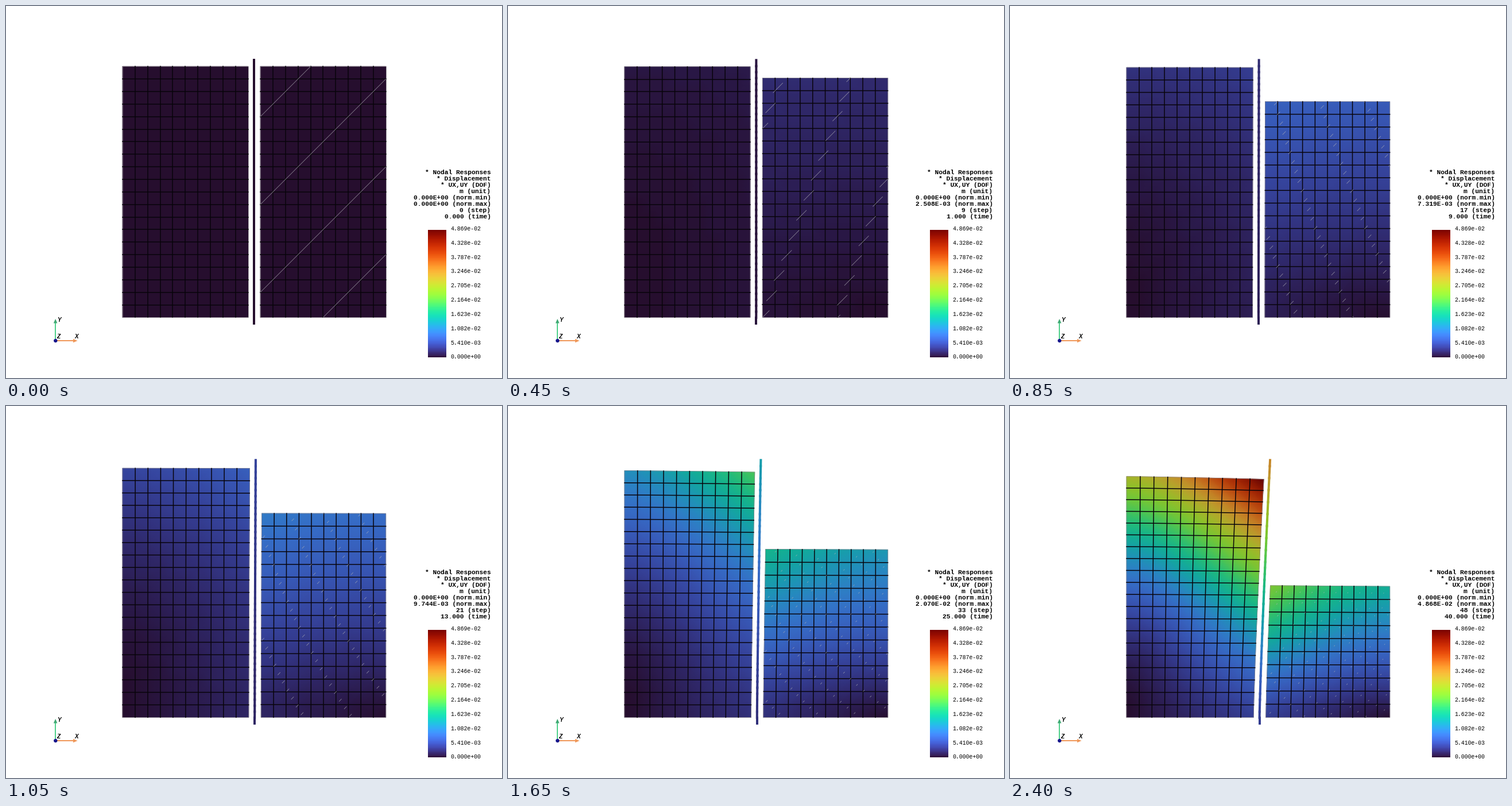
A matplotlib script for the animation above (2.45 s loop, 864 px wide and 648 px high).

```python
import math

import numpy as np
import matplotlib.pyplot as plt
from matplotlib.animation import FuncAnimation
from matplotlib.collections import LineCollection
from matplotlib.colors import ListedColormap, Normalize
from matplotlib.patches import Circle, Polygon, Rectangle

W, H, DPI = 864, 648, 100
STEPS, GRAVITY = 49, 8
CELL, COLS, ROWS = 153 / 7, 10, 20
LEFT, RIGHT, WALL, BASE = 203.0, 443.1, 432.0, 542.4
HEIGHT = CELL * ROWS
PX_PER_M = 622
VMAX = 4.869e-2

# Displacements in pixels at the excavation stages listed first.
STAGE = [0, 1, 3, 5, 7, 8.3, 10.3]
WALL_FOOT = [0, 0.3, 0.9, 1.5, 1.8, 2.2, 2.6]
WALL_TOP = [0, 0.4, 1.6, 4.2, 8.2, 11.4, 20.5]
SINK_FAR = [0, 0.5, 1.9, 4.2, 7.4, 10, 17.5]
SINK_NEAR = [0, 0.5, 2, 5, 9.9, 13.1, 22.3]
HEAVE = [0, 1.55, 4.4, 6.9, 8.7, 9.4, 11]
PEAK = [0, 2.508e-3, 7.319e-3, 1.217e-2, 2.070e-2, 2.788e-2, 4.868e-2]

turbo = plt.get_cmap("turbo")
lit = ListedColormap(turbo(np.linspace(0, 1, 256)) * [0.78, 0.78, 0.78, 1])
norm = Normalize(0, VMAX)


def px(n):
    return n * 72 / DPI


fig = plt.figure(figsize=(W / DPI, H / DPI), dpi=DPI, facecolor="white")
ax = fig.add_axes([0, 0, 1, 1])
ax.set_axis_off()


def label(x, y, text, size, **style):
    return ax.text(x, y, text, fontsize=px(size), va="baseline",
                   color="black", **style)


def draw_color_bar():
    ramp = np.linspace(1, 0, 256)[:, None]
    ax.imshow(ramp, cmap=turbo, extent=(735, 767, 612, 390), aspect="auto",
              interpolation="nearest", vmin=0, vmax=1)
    for k in range(10):
        label(774.5, 614.3 - 24.8 * k, f"{VMAX * k / 9:.3e}", 9.9,
              family="Liberation Mono")


def draw_axes_marker():
    green, orange = "#4fd08a", "#f0985a"
    ax.add_patch(Rectangle((85.2, 551), 1.8, 31, color=green, lw=0))
    ax.add_patch(Rectangle((87, 582.2), 31, 1.8, color=orange, lw=0))
    ax.add_patch(Polygon([(86.1, 545), (82.8, 552.5), (89.4, 552.5)],
                         color="#3fa873", lw=0))
    ax.add_patch(Polygon([(124.5, 583.1), (117, 579.9), (117, 586.3)],
                         color=orange, lw=0))
    ax.add_patch(Circle((86.3, 583), 3.2, color="#14148c", lw=0))
    for x, y, name in ((92.3, 550, "Y"), (122.5, 579.3, "X"), (91.2, 579.3, "Z")):
        label(x, y, name, 10, ha="center", family="Liberation Sans",
              weight="bold", style="italic")


def excavation(step):
    """Return analysis time, number of removed rows and loading stage."""
    if step <= GRAVITY:
        return step, 0, 0
    time = step - GRAVITY
    removed = math.ceil(time / 4)
    return time, removed, removed + 0.1 * ((time - 1) % 4)


def settlement(step):
    if step == 0 or step > GRAVITY:
        return 0
    return 1.8e-2 if step <= 4 else 2.2e-2


def at(stage, values):
    return float(np.interp(stage, STAGE, values))


def wall_shift(h, stage):
    foot, top = at(stage, WALL_FOOT), at(stage, WALL_TOP)
    return foot + (top - foot) * np.clip(h, 0, 1.05) ** 1.2


def block(x0, rows, ux, uy):
    """Deformed node grid and displacement size for one soil block."""
    i, j = np.meshgrid(np.arange(COLS + 1), np.arange(rows + 1))
    s, h = i / COLS, j / ROWS
    dx, dy = ux(s, h), uy(s, h)
    size = np.hypot(dx, dy) / PX_PER_M
    return x0 + i * CELL + dx, BASE - j * CELL + dy, size


def draw_block(x, y, size):
    mesh = ax.pcolormesh(x, y, size, shading="gouraud", cmap=lit, norm=norm,
                         zorder=2)
    nodes = np.dstack([x, y])
    inner = list(nodes[1:-1]) + list(nodes.swapaxes(0, 1)[1:-1])
    lines = LineCollection(inner, colors="#08040b", linewidths=px(1.5),
                           capstyle="projecting", zorder=4)
    ring = np.vstack([nodes[0], nodes[:, -1], nodes[-1, ::-1], nodes[::-1, 0]])
    rim = LineCollection([ring], colors="#8a858c", linewidths=px(0.7), zorder=3)
    ax.add_collection(lines)
    ax.add_collection(rim)
    return [mesh, lines, rim]


def hairlines(x, y, tol=0.045):
    """Parts of the cell diagonals that fall on the pixel raster."""
    phase = RIGHT + BASE - 2 * CELL
    out = []
    for j in range(x.shape[0] - 1):
        for i in range(COLS):
            a = np.array([x[j, i], y[j, i]])
            b = np.array([x[j + 1, i + 1], y[j + 1, i + 1]])
            c0, c1 = a.sum() - phase, b.sum() - phase
            lo, hi = min(c0, c1), max(c0, c1)
            for n in range(math.ceil(lo - tol), math.floor(hi + tol) + 1):
                if hi - lo < 1e-6:
                    out.append([a, b])
                    continue
                t = np.clip([(n - tol - c0) / (c1 - c0),
                             (n + tol - c0) / (c1 - c0)], 0, 1)
                out.append([a + (b - a) * t.min(), a + (b - a) * t.max()])
    return out


def draw_wall(stage):
    h = np.linspace(-0.5 / ROWS, 1 + 0.5 / ROWS, 45)
    shift = wall_shift(h, stage)
    pts = np.column_stack([WALL + shift, BASE - h * HEIGHT])
    mid = (shift[1:] + shift[:-1]) / 2 / PX_PER_M
    wall = LineCollection(np.stack([pts[:-1], pts[1:]], axis=1),
                          colors=lit(norm(mid)), linewidths=px(4),
                          antialiased=True, capstyle="projecting", zorder=3)
    ax.add_collection(wall)
    return wall


draw_color_bar()
draw_axes_marker()
heading = [label(844.5, 293.4 + 11 * k, "", 11.2, ha="right", weight="bold",
                 family="Liberation Mono") for k in range(8)]
ax.set_xlim(0, W)
ax.set_ylim(H, 0)
ax.set_autoscale_on(False)
shapes = []


def update(step):
    while shapes:
        shapes.pop().remove()
    time, removed, stage = excavation(step)
    settle = settlement(step)
    rows = ROWS - removed
    far, near = at(stage, SINK_FAR), at(stage, SINK_NEAR)
    heave = at(stage, HEAVE)

    def sag(h):
        return settle * PX_PER_M * (1 - (1 - h) ** 2)

    left = block(LEFT, ROWS,
                 lambda s, h: wall_shift(h, stage) * s,
                 lambda s, h: (far + (near - far) * s ** 1.3) * h ** 2 + sag(h))
    right = block(RIGHT, rows,
                  lambda s, h: wall_shift(h, stage) * (1 - s),
                  lambda s, h: sag(h) - heave * (1 - 0.012 * stage * s)
                  * h * ROWS / rows)
    shapes.extend(draw_block(*left) + draw_block(*right))
    marks = LineCollection(hairlines(*right[:2]), colors=(0.7, 0.7, 0.72, 0.75),
                           linewidths=px(0.75), zorder=5)
    ax.add_collection(marks)
    shapes.extend([marks, draw_wall(stage)])

    peak = max(settle, at(stage, PEAK))
    lines = ["* Nodal Responses", "* Displacement", "* UX,UY (DOF)", "m (unit)",
             f"{0:.3E} (norm.min)", f"{peak:.3E} (norm.max)",
             f"{step} (step)", f"{time:.3f} (time)"]
    for item, text in zip(heading, lines):
        item.set_text(text)
    return shapes + heading


anim = FuncAnimation(fig, update, frames=STEPS, interval=50,
                     init_func=lambda: update(0), repeat=True, blit=False)
plt.show()
```
